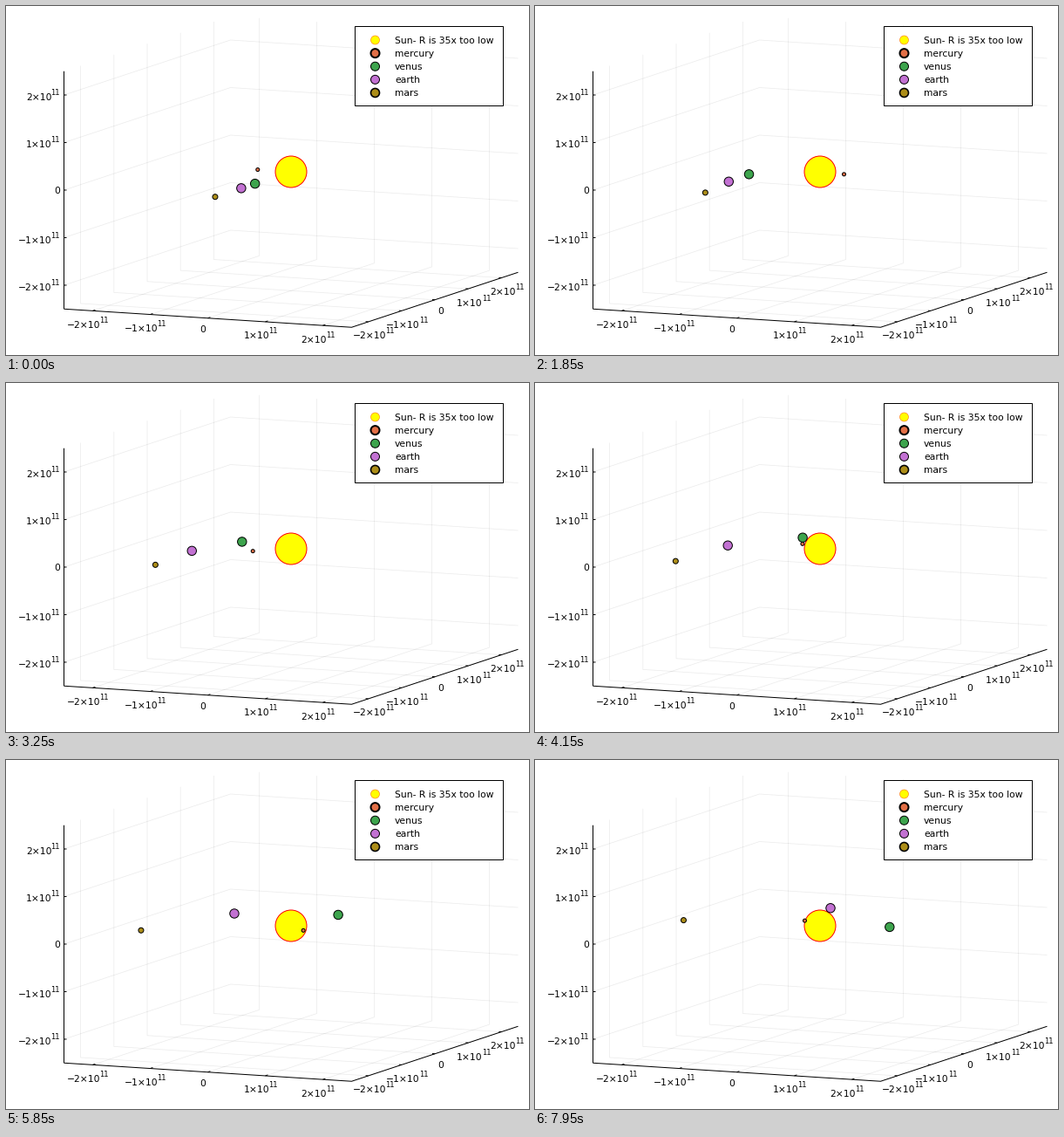
These frames come from a looping animation (600x400 px, 8000 ms). A matplotlib script:

```python
import numpy as np
import matplotlib.pyplot as plt
from matplotlib.animation import FuncAnimation
from matplotlib.patches import Circle, Rectangle

W, H, FRAMES, STEP_MS = 600, 400, 160, 50
PT = 0.72                      # points per pixel at 100 dpi
FONT = 10.75
LIM = 2.5                      # axis limit, in 1e11 m
TICKS = range(-2, 3)
GM, DAY, UNIT = 1.327e20, 86400.0, 1e11

# name, fill, radius, start (1e11 m), velocity (m/s), legend outline
PLANETS = [
    ("mercury", "#e26f46", 2.0, (-0.579, 0), (470, 45050), 2.0),
    ("venus", "#3da44d", 5.2, (0, -1.082), (-35000, 0), 1.0),
    ("earth", "#c271d2", 5.2, (0, -1.496), (-30000, 0), 1.0),
    ("mars", "#ac8d18", 3.0, (0, -2.279), (-24000, 0), 1.6),
]

plt.rcParams["font.family"] = "DejaVu Sans"
plt.rcParams["path.snap"] = False
fig = plt.figure(figsize=(W / 100, H / 100), dpi=100, facecolor="white")
ax = fig.add_axes([0, 0, 1, 1])
ax.set_xlim(0, W)
ax.set_ylim(H, 0)
ax.axis("off")


def project(x, y, z=0.0):
    return (327 + 66 * x + 38.2 * y,
            190 + 4.2 * x - 12.6 * y - 54.5 * z)


def line(*points, width=1.0, alpha=1.0, z=2):
    xs, ys = zip(*points)
    ax.plot(xs, ys, color="black", lw=width * PT, alpha=alpha, zorder=z,
            solid_capstyle="butt")


def edge(*corners, **style):
    line(*[project(*c) for c in corners], **style)


def text(x, y, s, size=FONT, ha="left"):
    ax.text(x, y, s, fontsize=size * PT, ha=ha, va="baseline", zorder=12)


def tick_label(value, x, y, align, drop):
    """Write value x 10^11 around x, its middle at y; drop lowers powers."""
    if value == 0:
        text(x, y + 4, "0", ha=align)
        return
    sup = 9.3
    sign = "\u2212" if value < 0 else ""
    base = f"{sign}{abs(value)}\u00d710"
    width = FONT * (2.746 + 0.838 * (value < 0)) + sup
    right = x if align == "right" else x + width / 2
    text(right - sup, y + 4 + drop, base, ha="right")
    text(right, y - 2 + drop, "11", size=8.4, ha="right")


def draw_axes():
    grid = dict(width=0.8, alpha=0.075, z=1)
    for t in TICKS:
        edge((t, -LIM, -LIM), (t, LIM, -LIM), (t, LIM, LIM), **grid)
        edge((LIM, t, -LIM), (-LIM, t, -LIM), (-LIM, t, LIM), **grid)
        edge((-LIM, -LIM, t), (-LIM, LIM, t), (LIM, LIM, t), **grid)

        px, py = project(t, -LIM, -LIM)
        line((px, py), (px + 2.9, py - 1))
        tick_label(t, px - 5.5, py + 12, "center", 3.5)

        px, py = project(LIM, t, -LIM)
        line((px, py), (px - 3, py - 0.2))
        tick_label(t, px + 6.5, py + 12, "center", 3.5)

        px, py = project(-LIM, -LIM, t)
        line((px, py), (px + 3, py))
        tick_label(t, 62, py, "right", 2)

    edge((-LIM, -LIM, LIM), (-LIM, -LIM, -LIM))
    edge((-LIM, -LIM, -LIM), (LIM, -LIM, -LIM), (LIM, LIM, -LIM))


def disc(x, y, r, fill, outline="black", width=1.0, z=5):
    return ax.add_patch(Circle((x, y), r, fc=fill, ec=outline,
                               lw=width * PT, zorder=z))


def draw_legend():
    ax.add_patch(Rectangle((400.5, 23.5), 170, 91, fc="white", ec="black",
                           lw=PT, zorder=10))
    disc(423.5, 39, 5, "yellow", "#ff5a00", 0.5, z=11)
    text(446, 43, "Sun- R is 35x too low")
    for i, (name, fill, _, _, _, width) in enumerate(PLANETS):
        y = 39 + 15.12 * (i + 1)
        disc(423.5, y, 5, fill, width=width, z=11)
        text(446, y + 4, name)


def orbit(start, velocity):
    """Daily positions, stepped with the semi-implicit Euler rule."""
    pos = np.array(start, float) * UNIT
    vel = np.array(velocity, float)
    path = []
    for _ in range(FRAMES):
        path.append(pos / UNIT)
        vel = vel - GM * pos / np.linalg.norm(pos) ** 3 * DAY
        pos = pos + vel * DAY
    return path


draw_axes()
draw_legend()
disc(*project(0, 0), 18, "yellow", "red", z=4)
paths = [orbit(p[3], p[4]) for p in PLANETS]
dots = [disc(0, 0, p[2], p[1], z=5 + i) for i, p in enumerate(PLANETS)]


def update(frame):
    for dot, path in zip(dots, paths):
        dot.center = project(*path[frame])
    return dots


anim = FuncAnimation(fig, update, frames=FRAMES, interval=STEP_MS,
                     init_func=lambda: update(0), repeat=True,
                     repeat_delay=0, blit=False)
plt.show()
```
